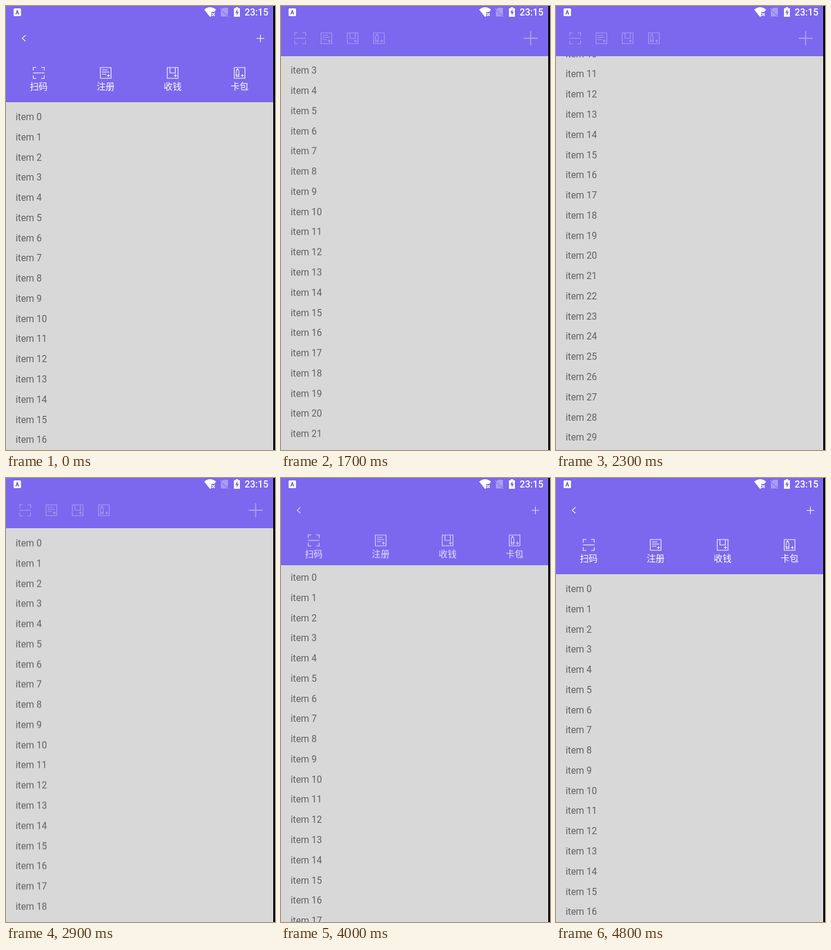
Write an HTML page that moves like this. It is 452 px wide and 743 px high and loops after 5800 ms.

```html
<!DOCTYPE html>
<html lang="zh-CN">
<head>
<meta charset="utf-8">
<title>Collapsing header</title>
<style>
  html, body { margin: 0; width: 100%; height: 100%; overflow: hidden; background: #000; }
  svg { display: block; width: 100%; height: 100%; }
  .line { fill: none; stroke: #fff; stroke-width: 1.1; }
  .item { font: 15.7px Roboto, sans-serif; fill: #616161; }
  .label { font: 15px "Noto Sans CJK SC", "Noto Sans CJK", sans-serif; fill: #fff; text-anchor: middle; }
  .clock { font: 500 15.7px Roboto, sans-serif; fill: #fff; }
  .badge { font: 700 9.5px Roboto, sans-serif; fill: #5546b4; text-anchor: middle; }
</style>
</head>
<body>
<svg viewBox="0 0 452 743">
  <defs>
    <clipPath id="headerClip"><rect y="-100" width="449" height="261"/></clipPath>
    <path id="corner" d="M-9.2-4V-9.2H-4"/>
    <g id="scan" class="line">
      <use href="#corner"/>
      <use href="#corner" transform="rotate(90)"/>
      <use href="#corner" transform="rotate(180)"/>
      <use href="#corner" transform="rotate(270)"/>
      <path d="M-9.5 0H9.5"/>
    </g>
    <path id="frame" d="M-9-9H9V9H-9ZM2 4.5H7.4M4.7 1.8V7.2"/>
    <g id="form" class="line">
      <use href="#frame"/><path d="M-6.5-5H3M-6.5-1.5H6M-6.5 2H1"/>
    </g>
    <g id="collect" class="line">
      <use href="#frame"/><path d="M-4.5-9V0H4.5V-9"/>
    </g>
    <g id="cards" class="line">
      <use href="#frame"/><path d="M-5.8 6V-2Q-5.5-5-3.5-7Q-1.5-5-1.2-2V6ZM-5.8 3.5H-1.2"/>
    </g>
  </defs>

  <rect width="449" height="743" fill="#d8d8d8"/>
  <g id="list"></g>

  <g id="header" clip-path="url(#headerClip)">
    <rect y="-100" width="449" height="261" fill="#7b68ee"/>
    <g id="grid"></g>
  </g>

  <g id="openBar" class="line">
    <path d="M32.8 49L27.2 54L32.8 59M421 54.2H434M427.5 47.7V60.7"/>
  </g>
  <g id="closedBar">
    <path class="line" style="stroke-width:1.8" d="M407.8 54H431.2M419.5 42.3V65.7"/>
  </g>

  <g fill="#fff">
    <rect x="12.8" y="4" width="12.4" height="13" rx="1.5"/>
    <text class="badge" x="19" y="13.8">A</text>
    <path d="M333 6Q343-2 353 6L350 10H345V16.5L343 18.5Z"/>
    <path class="line" style="stroke-width:1.5" d="M346 11.8L350.8 16.6M350.8 11.8L346 16.6"/>
    <g opacity=".35">
      <path d="M365 3H373V15.3L361.6 5.8ZM361 7.2L371.5 17.5H361Z"/>
      <path class="line" d="M360 4L373.5 18"/>
    </g>
    <path d="M386 2H390V3.7H393V18H383V3.7H386Z"/>
    <path d="M389 5.5L385 11.5H387.6V16L391.3 9.8H389Z" fill="#7b68ee"/>
    <text class="clock" x="401" y="16.4">23:15</text>
  </g>
  <rect x="449" width="3" height="743" fill="#000"/>
</svg>

<script>
const LOOP = 5800, TICK = 100, RANGE = 77, PITCH = 33.77;
const $ = id => document.getElementById(id);

// Each swipe moves the list to a scroll position; the header may lag behind it.
const SWIPES = [
  { start: 1200, end: 2300, to: 443, power: 1.15 },
  { start: 2500, end: 2900, to: 76.5 },
  { start: 3200, end: 3400, to: 0 },
  { start: 3900, end: 4400, to: 81, power: .9, lag: 4 },
  { start: 4400, end: 4800, to: 0, lag: 4 }
];

function pose(time) {
  let scroll = 0, headerLag = 0;
  for (const { start, end, to, power = 1, lag = 0 } of SWIPES) {
    if (time <= start) break;
    const progress = Math.min(1, (time - start) / (end - start)) ** power;
    scroll += (to - scroll) * progress;
    headerLag = lag;
  }
  const offset = Math.round(Math.max(0, Math.min(RANGE, scroll - headerLag)));
  return { scroll, offset, open: offset <= RANGE / 2, fade: 1 - offset / RANGE };
}

function add(parent, tag, attrs, text = "") {
  const el = document.createElementNS("http://www.w3.org/2000/svg", tag);
  for (const name in attrs) el.setAttribute(name, attrs[name]);
  el.textContent = text;
  parent.append(el);
}

for (let i = 0; i < 32; i++)
  add($("list"), "text", { class: "item", x: 16.3, y: 191 + i * PITCH }, "item " + i);

[["scan", "扫码"], ["form", "注册"], ["collect", "收钱"], ["cards", "卡包"]].forEach(([icon, label], i) => {
  const x = 55 + i * 112.5;
  add($("grid"), "use", { href: "#" + icon, x, y: 112 });
  add($("grid"), "text", { class: "label", x, y: 139.6 }, label);
  add($("closedBar"), "use", { href: "#" + icon, x: 32.2 + i * 44.1, y: 54 });
});

function play(id, style) {
  const frames = [];
  for (let time = 0; time <= LOOP; time += TICK)
    frames.push({ offset: time / LOOP, easing: "step-end", ...style(pose(time)) });
  $(id).animate(frames, { duration: LOOP, iterations: Infinity });
}

const moveY = y => `translateY(${y}px)`;

play("list", ({ scroll }) => ({ transform: moveY(-scroll) }));
play("header", ({ offset }) => ({ transform: moveY(-offset) }));
play("grid", ({ offset, fade }) => ({ transform: moveY(offset / 2), opacity: fade }));
play("openBar", ({ open, fade }) => ({ opacity: open ? fade : 0 }));
play("closedBar", ({ open }) => ({ opacity: open ? 0 : .37 }));
</script>
</body>
</html>
```
